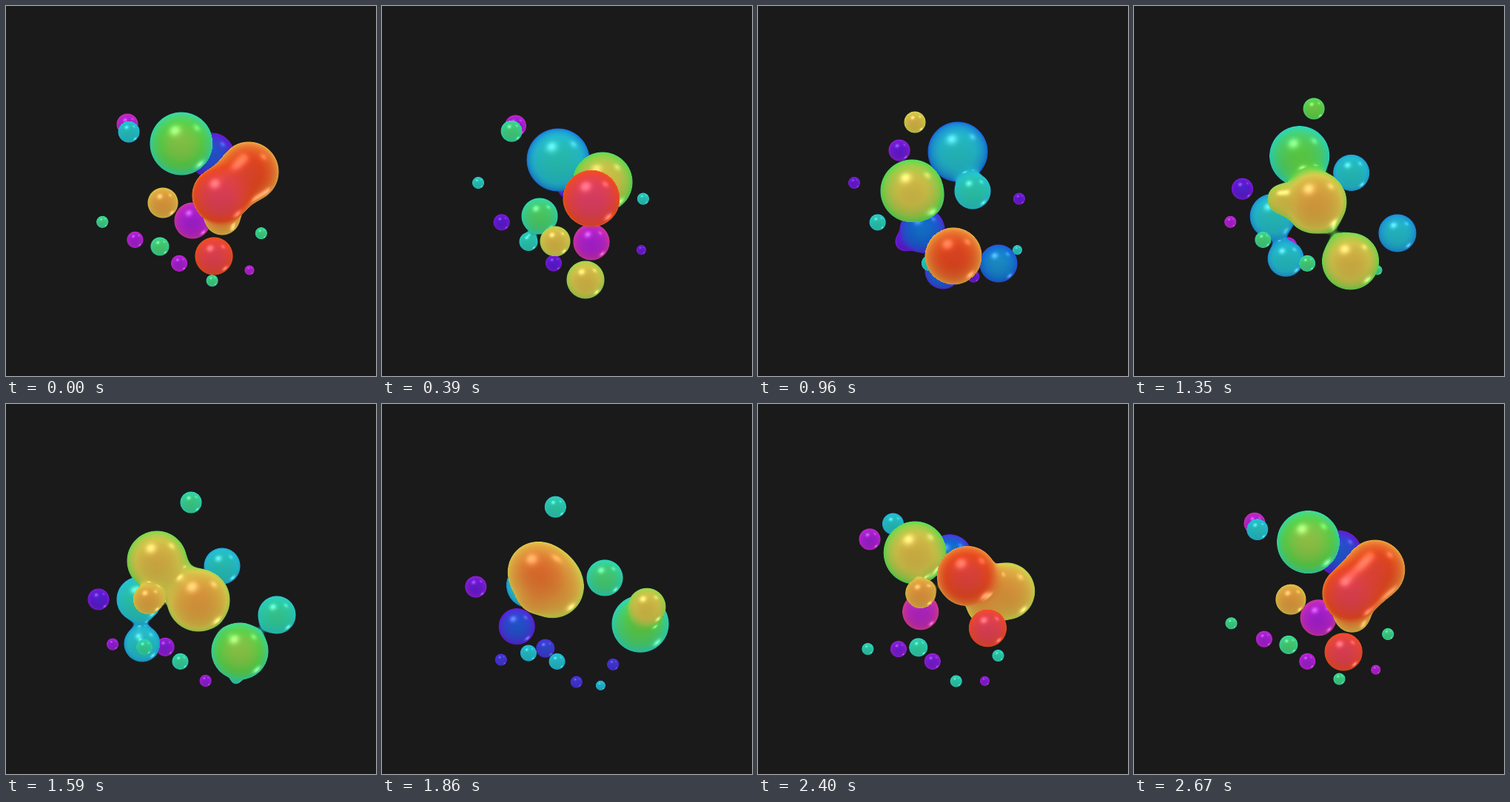
An HTML page with a canvas that plays this animation: 500x500 px, repeating every 2.7 s.

```html
<!DOCTYPE html>
<html lang="en">
<head>
<meta charset="utf-8">
<title>Liquid blobs</title>
<style>
html, body { margin: 0; height: 100%; overflow: hidden; background: #1a1a1a; }
canvas { display: block; width: 100vw; height: 100vh; }
</style>
</head>
<body>
<canvas width="500" height="500"></canvas>
<script>
const ctx = document.querySelector('canvas').getContext('2d');
const LOOP = 2700, STEP = 30, TILE = 16;
const LEFT = 90, TOP = 110, SIZE = 320, BACK = 26;

// Each ball: radius, then the x, y, z points of its closed path.
const bodies = [
  [40, 328,224,32, 298,238,-22, 270,197,-100, 204,212,-15, 236,238,32],
  [42, 237,186,-45, 238,208,-95, 208,250,-24, 260,265,-4, 199,222,-6],
  [38, 290,256,52, 283,260,57, 264,338,32, 316,334,-40, 367,260,-42],
  [25, 281,338,62, 275,370,-4, 325,348,-105, 366,285,-60, 338,278,45],
  [24, 252,290,-168, 283,319,-170, 250,358,-115, 184,324,-82, 195,282,-170],
  [24, 292,285,20, 213,284,-45, 290,250,-70, 292,219,-78, 308,258,-15],
  [20, 212,266,18, 234,318,2, 225,262,-30, 192,264,14, 225,255,20]
];
const beads = [
  [30, 278,202,-130, 222,303,-120, 180,264,-75],
  [14, 166,170,-72, 212,157,8, 250,133,-45],
  [14, 164,160,-160, 191,195,-137, 125,264,-132]
];
const bodyKeys = [0, 390, 960, 1590, 2130], beadKeys = [0, 960, 1590];

// Colours by depth, evenly spaced from near to far.
const NEAR = 95, BAND = 27;
const ramp = '#de3e64 #e0461e #dc913a #cdbf48 #5acb46 #2dc8a0 #22b4c6 #1264cc #5a18cd #ac20ca #d03a7d'
  .split(' ').map(hex => parseInt(hex.slice(1), 16));
const channel = (color, c) => color >> (16 - 8 * c) & 255;

function depthColor(z) {
  const p = Math.min(ramp.length - 1.001, Math.max(0, (NEAR - z) / BAND));
  const i = Math.floor(p), f = p - i;
  return c => channel(ramp[i], c) * (1 - f) + channel(ramp[i + 1], c) * f;
}

const sphere = (r, x, y, z) => ({ r, x, y, z, k: 4 + r * 0.55 });

// Smooth closed curve through unevenly timed points.
function locate(ball, keys, time) {
  const n = keys.length;
  const key = i => keys[(i + n) % n] + Math.floor(i / n) * LOOP;
  let i = n - 1;
  while (keys[i] > time) i--;
  const start = key(i), end = key(i + 1), span = end - start;
  const u = (time - start) / span, v = 1 - u;
  const along = axis => {
    const at = k => ball[((i + k + n) % n) * 3 + axis];
    const m1 = (at(1) - at(-1)) / (end - key(i - 1)) * span;
    const m2 = (at(2) - at(0)) / (key(i + 2) - start) * span;
    return at(0) * (1 + 2 * u) * v * v + m1 * u * v * v
      + at(1) * u * u * (3 - 2 * u) - m2 * u * u * v;
  };
  return sphere(ball[0], along(1), along(2), along(3));
}

// Small drops fan out and gather again below the body.
function droplet(i, time) {
  const turn = 2 * Math.PI * time / LOOP;
  const wave = Math.cos(Math.PI / 3 * (i - 1));
  const angle = Math.PI / 2 + (i - 2.83) * 0.42 * (1 + 0.45 * Math.sin(turn));
  const reach = 98 + 30 * wave;
  return sphere(9 - 3 * wave,
    240 + reach * Math.cos(angle),
    265 + reach * Math.sin(angle),
    -95 + 58 * Math.cos(Math.PI * i + turn));
}

function place(time) {
  return [
    ...bodies.map(b => locate(b, bodyKeys, time)),
    ...beads.map(b => locate(b, beadKeys, time)),
    ...Array.from({ length: 7 }, (_, i) => droplet(i, time))
  ].sort((a, b) => b.r - a.r);
}

// Distance to the smooth union of the balls.
function distance(list, x, y, z) {
  let d = 1e3;
  for (const b of list) {
    const dx = x - b.x, dy = y - b.y, dz = z - b.z;
    const e = Math.sqrt(dx * dx + dy * dy + dz * dz) - b.r;
    const h = Math.max(0, b.k - Math.abs(d - e));
    d = Math.min(d, e) - h * h / (4 * b.k);
  }
  return d;
}

function shade(list, x, y, z) {
  const d = distance(list, x, y, z);
  let nx = distance(list, x + 0.5, y, z) - d;
  let ny = distance(list, x, y + 0.5, z) - d;
  let nz = distance(list, x, y, z + 0.5) - d;
  const len = Math.hypot(nx, ny, nz) || 1;
  nx /= len; ny /= len; nz /= len;
  const glint = (lx, ly, lz, power) => Math.max(0, nx * lx + ny * ly + nz * lz) ** power;
  const light = 0.95 + 0.08 * (1 - nz) - 0.08 * ny;
  const shine = 65 * glint(-0.2, -0.42, 0.885, 60)
    + 75 * glint(0.6, 0.66, 0.452, 90)
    + 40 * glint(0.5, -0.5, 0.707, 130);
  const base = depthColor(z);
  return c => base(c) * light + shine;
}

function paintTile(image, list, left, top) {
  const high = Math.max(...list.map(b => b.z + b.r)) + 6;
  const low = Math.min(...list.map(b => b.z - b.r));
  for (let py = top; py < top + TILE; py++) {
    for (let px = left; px < left + TILE; px++) {
      const x = px + LEFT + 0.5, y = py + TOP + 0.5;
      let z = high, nearest = 1, hitZ = 0;
      for (let i = 0; i < 60 && z > low; i++) {
        const d = distance(list, x, y, z);
        if (d < nearest) { nearest = d; hitZ = z; }
        if (d < 0.25) { nearest = 0; break; }
        z -= d;
      }
      if (nearest >= 1) continue;
      const color = shade(list, x, y, hitZ), at = (py * SIZE + px) * 4;
      for (let c = 0; c < 3; c++) {
        image.data[at + c] = color(c) * (1 - nearest) + BACK * nearest;
      }
    }
  }
}

function render(time) {
  const image = ctx.createImageData(SIZE, SIZE);
  new Uint32Array(image.data.buffer).fill(0xff1a1a1a);
  const balls = place(time);
  for (let top = 0; top < SIZE; top += TILE) {
    for (let left = 0; left < SIZE; left += TILE) {
      const cx = left + LEFT + TILE / 2, cy = top + TOP + TILE / 2;
      const list = balls.filter(b => Math.hypot(b.x - cx, b.y - cy) < b.r + TILE + b.k);
      if (list.length) paintTile(image, list, left, top);
    }
  }
  return image;
}

const cache = [];
let shown = -1;
function draw() {
  const step = Math.floor(performance.now() % LOOP / STEP);
  if (step !== shown) {
    cache[step] ??= render(step * STEP);
    ctx.putImageData(cache[step], LEFT, TOP);
    shown = step;
  }
  requestAnimationFrame(draw);
}
draw();
</script>
</body>
</html>
```
